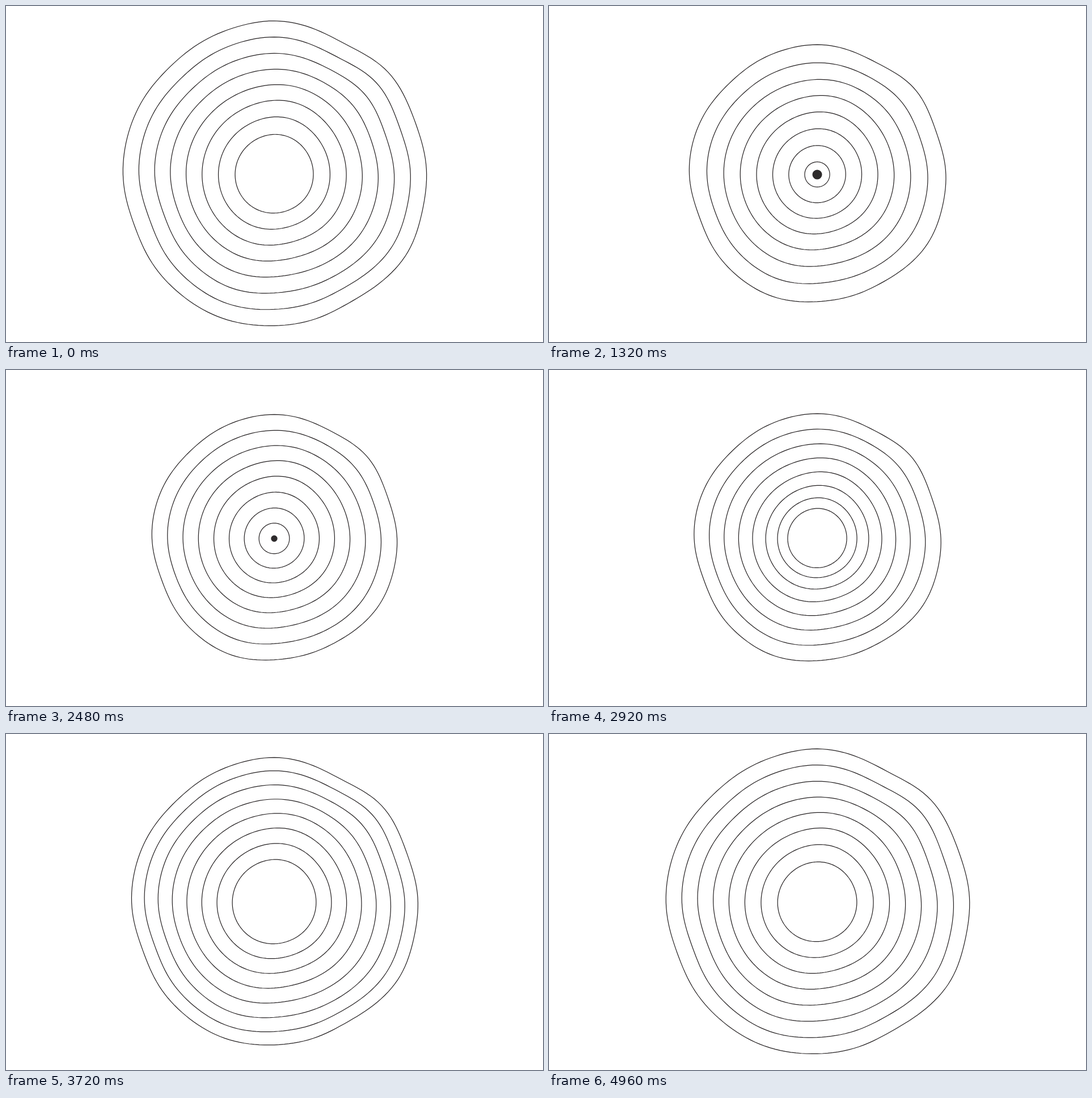
Write an HTML page with a canvas that moves like this. It is 947 px wide and 592 px high and loops after 5 s.

```html
<!DOCTYPE html>
<html>
<head>
<meta charset="utf-8">
<style>
html, body { margin: 0; width: 100%; height: 100%; overflow: hidden; background: #fff; }
canvas { display: block; }
</style>
</head>
<body>
<canvas id="stage" width="947" height="592"></canvas>
<script>
const ctx = document.getElementById('stage').getContext('2d');
const LOOP = 5000, HALF = LOOP / 2, STEP = 40;
const CX = 473, CY = 297, INK = '#231f20';

const mod = (a, n) => ((a % n) + n) % n;

// A soft bump in the plane that pushes nearby lines outwards (or inwards if negative)
function bump(degrees, distance, height) {
  const a = degrees * Math.PI / 180;
  const bx = distance * Math.cos(a), by = distance * Math.sin(a);
  return (x, y) => height * Math.exp(-((x - bx) ** 2 + (y - by) ** 2) / 4000);
}

const terrain = [
  bump(30, 270, 5), bump(112, 235, 2.5), bump(270, 270, 3.5),
  bump(285, 125, 4.5), bump(318, 250, 4), bump(357, 265, 2),
  bump(60, 262, -5.5), bump(84, 205, -3.5), bump(72, 135, -4),
  bump(160, 240, -6), bump(226, 245, -3.5), bump(299, 262, -6), bump(341, 225, -4.5)
];

// 1 = expanded, 0 = contracted; each ring follows the one inside it
function spread(t, i) {
  const u = mod(t - 380 - 101.5 * i + HALF / 2, LOOP);
  const d = u % HALF - HALF / 2;
  const tail = .5 * Math.exp(-.004 * Math.abs(d));
  const s = d < 0 ? tail : 1 - tail;
  return u < HALF ? 1 - s : s;
}

function ring(radius) {
  ctx.beginPath();
  for (let a = 0; a < 2 * Math.PI; a += Math.PI / 90) {
    const cos = Math.cos(a), sin = Math.sin(a);
    const r = terrain.reduce((sum, push) => sum + push(radius * cos, radius * sin), radius);
    ctx.lineTo(CX + r * cos, CY + r * sin);
  }
  ctx.closePath();
  ctx.stroke();
}

function draw(now) {
  const t = Math.floor(now % LOOP / STEP) * STEP;
  ctx.fillStyle = '#fff';
  ctx.fillRect(0, 0, 947, 592);
  ctx.strokeStyle = INK;
  ctx.lineWidth = 1.2;
  for (let i = 0; i < 8; i++) ring(21.4 + 27.85 * i + (53.4 - .3 * i) * spread(t, i));

  ctx.fillStyle = '#2e2b2c';
  ctx.beginPath();
  ctx.arc(CX, CY, Math.max(0, 8.7 - 20 * spread(t, -1)), 0, 2 * Math.PI);
  ctx.fill();
}

const start = performance.now();
function frame() {
  draw(performance.now() - start);
  requestAnimationFrame(frame);
}
frame();
</script>
</body>
</html>
```
